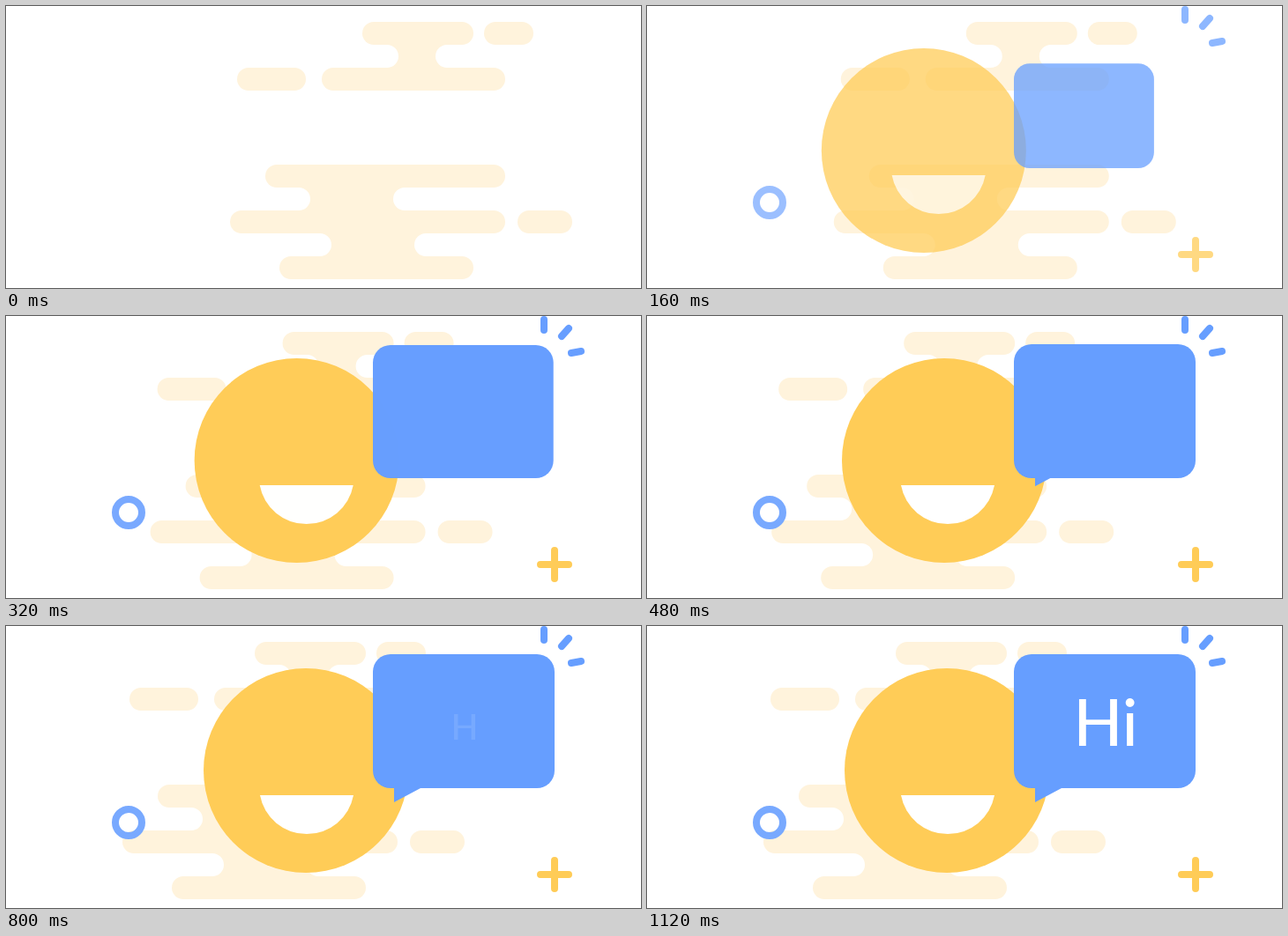
An HTML page for the animation above (2920 ms loop, 720 by 320 pixels).

```html
<!DOCTYPE html>
<html lang="en">
<head>
<meta charset="utf-8">
<title>Hi</title>
<style>
  html, body { margin: 0; width: 100%; height: 100%; overflow: hidden; background: #fff; }
  svg { display: block; width: 720px; height: 320px; }
  .blue { fill: #669eff; }
  .yellow { fill: #ffcc57; }
  .stroke { fill: none; stroke-width: 8; stroke-linecap: round; }
  text { font: 500 73px Lato, Roboto, sans-serif; fill: #fff; text-anchor: middle; }
</style>
</head>
<body>
<svg viewBox="0 0 720 320">
  <g id="clouds" fill="#fff3dc"></g>
  <g class="fade stroke">
    <circle cx="139" cy="223" r="15" stroke="#78a9ff"/>
    <path d="M610 4V16M630 23L638 14M641 42L652 40" stroke="#669eff"/>
    <path d="M606 282H638M622 266V298" stroke="#ffcc57"/>
  </g>
  <circle id="face" class="fade yellow" cx="340" cy="164" r="116"/>
  <path id="mouth" class="fade" fill="#fff" d="M288 192A53.9 53.9 0 0 0 394 192Z"/>
  <path id="tail" class="blue" d="M0 0H30L0 16Z"/>
  <rect id="bubble" class="fade blue" x="416"/>
  <text id="greeting" y="15"></text>
</svg>
<script>
const LOOP = 2920, STEP = 40, SHORT = 360, LONG = 720;
const TAIL_START = 360, TEXT_START = 760, SECOND_LETTER = 960;
const byId = id => document.getElementById(id);
const set = (el, attrs) => {
  for (const name in attrs) el.setAttribute(name, attrs[name]);
};
const mix = (from, to, p) => from + (to - from) * p;

// Clouds: pills [left, right, top] and necks [left, right, top] with hollow round sides.
const pills = [
  [404, 530, 18], [542, 598, 18], [262, 340, 70], [358, 566, 70],
  [294, 566, 180], [254, 566, 232], [580, 642, 232], [310, 530, 284]
];
const necks = [[432, 500, 44], [332, 452, 206], [356, 476, 258]];
byId('clouds').innerHTML =
  pills.map(([l, r, y]) =>
    `<rect x="${l}" y="${y}" width="${r - l}" height="26" rx="13"/>`).join('') +
  necks.map(([l, r, y]) =>
    `<path d="M${l} ${y}a13 13 0 0 1 0 26H${r}a13 13 0 0 1 0-26Z"/>`).join('');

// Same curve as the CSS keyword "ease": cubic-bezier(.25, .1, .25, 1).
function ease(x) {
  if (x <= 0) return 0;
  if (x >= 1) return 1;
  let low = 0, high = 1, s;
  for (let i = 0; i < 24; i++) {
    s = (low + high) / 2;
    if (s * (0.75 - 0.75 * s + s * s) < x) low = s; else high = s;
  }
  const r = 1 - s;
  return 0.3 * s * r * r + 3 * s * s * r + s * s * s;
}

function draw(time) {
  const slide = ease(time / LONG);
  const appear = ease(time / SHORT);
  const tail = ease((time - TAIL_START) / SHORT);
  const text = ease((time - TEXT_START) / SHORT);

  for (const el of document.querySelectorAll('.fade')) set(el, { opacity: appear });
  set(byId('clouds'), { transform: `translate(${-122 * slide} 0)` });
  set(byId('face'), { transform: `translate(${mix(-40, 0, slide)} 0)` });
  set(byId('mouth'), { transform: `translate(${mix(-40, 0, appear)} 0)` });

  const height = mix(24, 152, appear);
  set(byId('bubble'), {
    y: 184 - height, width: mix(24, 206, appear), height, rx: mix(12, 20, appear)
  });
  set(byId('tail'), { transform: `translate(440 184) scale(${tail})` });

  byId('greeting').textContent = time < SECOND_LETTER ? 'H' : 'Hi';
  set(byId('greeting'), {
    opacity: text,
    transform: `translate(520 121) scale(${mix(0.5, 1, text)})`
  });
}

const start = performance.now();
function tick() {
  const time = (performance.now() - start) % LOOP;
  draw(Math.floor(time / STEP) * STEP);
  requestAnimationFrame(tick);
}
tick();
</script>
</body>
</html>
```
